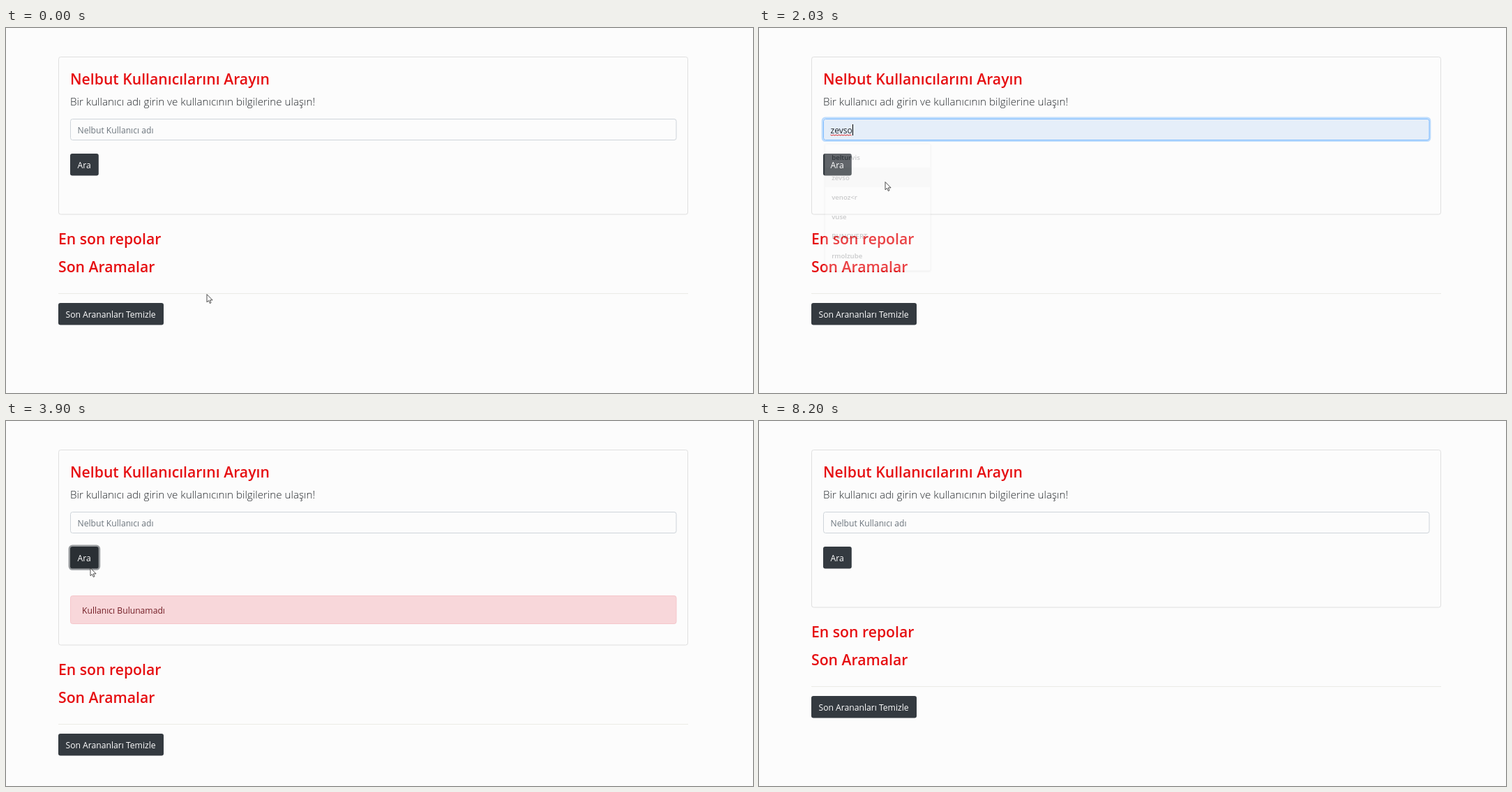
Write an HTML page that moves like this. It is 1071 px wide and 523 px high and loops after 8.23 s.

```html
<!DOCTYPE html>
<html lang="tr">
<head>
<meta charset="utf-8">
<title>Kullanıcı arama</title>
<style>
  html, body { margin: 0; width: 100%; height: 100%; overflow: hidden; background: #fcfcfc; }
  svg { display: block; width: 100%; height: 100%; font: 12.15px "Open Sans", "Noto Sans", sans-serif; fill: #212529; }
  .title { font-size: 21.2px; font-weight: 600; fill: #e60f12; }
  .lead { font-size: 15.2px; font-weight: 300; }
  .line { fill: none; stroke: #dfdfdf; }
  .dark { fill: #343a40; }
  .light { fill: #fff; }
  .ring { fill: none; stroke-width: 2.6; }
  #popup { font-size: 10px; font-weight: 600; transform-origin: 170px 257px; }
  #sheet { fill: #fcfcfc; stroke: #dedede; stroke-width: .6; filter: drop-shadow(0 1px 1.5px #0004); }
  #pointer path { stroke-linejoin: round; stroke-linecap: round; }
</style>
</head>
<body>
<svg viewBox="0 0 1071 523">
  <rect id="card" class="line" x="75.5" y="41.5" width="902" height="225.5" rx="3"/>
  <text class="title" x="92" y="81">Nelbut Kullanıcılarını Arayın</text>
  <text class="lead" x="92" y="111">Bir kullanıcı adı girin ve kullanıcının bilgilerine ulaşın!</text>

  <rect id="inputRing" class="ring" x="91" y="128.7" width="871" height="33" rx="4" stroke="#007bff"/>
  <rect id="input" x="92.5" y="130.5" width="868.5" height="30" rx="3"/>
  <text id="value" x="102.5" y="151"></text>
  <path id="squiggle" fill="none" stroke="#e02020"/>
  <path id="caret" stroke="#000" d="M0 138v16"/>

  <rect id="buttonRing" class="ring" x="90.9" y="178.9" width="43" height="33.6" rx="4.2" stroke="#343a40"/>
  <rect id="button" x="92" y="180" width="40.8" height="31.4" rx="3"/>
  <text class="light" x="102.5" y="201">Ara</text>

  <g id="alert">
    <rect x="92.5" y="250.5" width="868.5" height="40" rx="3" fill="#f8d7da" stroke="#f5c6cb"/>
    <text x="109" y="276" fill="#721c24">Kullanıcı Bulunamadı</text>
  </g>

  <g id="lower">
    <text class="title" x="75" y="309.5">En son repolar</text>
    <text class="title" x="75" y="350">Son Aramalar</text>
    <path class="line" d="M75 380.5H978" style="stroke:#ebebe6"/>
    <rect class="dark" x="75" y="394" width="151" height="31.4" rx="3"/>
    <text class="light" x="85.5" y="415">Son Arananları Temizle</text>
  </g>

  <g id="popup">
    <rect id="sheet" x="91.5" y="162.5" width="157.5" height="189" rx="2"/>
    <rect id="highlight" x="92" width="156.5" height="29.3" fill="#ececec"/>
  </g>

  <g id="pointer">
    <path id="arrow" fill="#fff" stroke="#222" stroke-width=".8" d="M0 0V10.8L2.5 8.5 4.3 12.5 6 11.7 4.3 7.9H7.7Z"/>
    <path id="beam" fill="none" stroke="#333" d="M-2.5-5.5H-.8L0-5 .8-5.5H2.5M0-5V5M-2.5 5.5H-.8L0 5 .8 5.5H2.5"/>
    <path id="hand" fill="#fff" stroke="#222" stroke-width=".7" d="M-1 1Q0-.8 1 1V5Q2.3 4 3 5.3 4.4 4.6 5 6 6.8 5.7 6.8 7.5V10Q6.5 11.5 5.5 12.5V14H-.2V12.8L-4 8.2Q-4.2 6.4-2.5 7L-1 8.5Z"/>
  </g>
</svg>
<script>
const LOOP = 8230;
const $ = id => document.getElementById(id);
const set = (id, attrs) => { for (const k in attrs) $(id).setAttribute(k, attrs[k]); };
const show = (id, on) => { $(id).style.display = on ? '' : 'none'; };
const ramp = (t, start, length) => Math.min(1, Math.max(0, (t - start) / length));
const ease = p => p * p * (3 - 2 * p);
const mix = (a, b, p) => a + (b - a) * p;
const blend = (a, b, p) => `rgb(${a.map((v, i) => Math.round(mix(v, b[i], p)))})`;

const FOCUS = 720, PICK = 1930, PRESS = 2870, RELEASE = 3020, ALERT = 3400, CLEAR = 5400, BLUR = 7400;
const HOVER_IN = 2440, HOVER_OUT = 3840;
const names = ['belturvis', 'zevso', 'venoz<r', 'vuse', 'BUNOVERT', 'rmolzube'];
const ROW = 29.3, FIRST_ROW = 168.3;

// time, x, y
const route = [
  [30, 288, 382], [690, 261, 150], [900, 261, 150], [1430, 183, 216], [1630, 183, 216],
  [1900, 181, 221], [2120, 181, 221], [2620, 114, 192], [3700, 115, 193], [3900, 121, 211],
  [4400, 215, 278], [4950, 250, 285], [5770, 690, 330], [5930, 720, 335], [6100, 720, 335],
  [6330, 856, 405], [6830, 962, 530]
];

names.forEach((name, i) => {
  const label = document.createElementNS('http://www.w3.org/2000/svg', 'text');
  label.textContent = name;
  label.setAttribute('x', 101.5);
  label.setAttribute('y', 186.7 + i * ROW);
  $('popup').append(label);
});

function pointerAt(t) {
  const next = route.findIndex(p => p[0] > t);
  if (next === 0) return route[0].slice(1);
  if (next < 0) return route.at(-1).slice(1);
  const [a, b] = [route[next - 1], route[next]];
  const p = ease(ramp(t, a[0], b[0] - a[0]));
  return [mix(a[1], b[1], p), mix(a[2], b[2], p)];
}

function drawInput(t, hovered) {
  const picked = t >= PICK && t < ALERT;
  const text = picked ? names[1] : names[hovered];
  const focused = t >= FOCUS && t < PRESS;
  const focus = ramp(t, FOCUS, 150) - ramp(t, PRESS, 100);
  set('input', {
    fill: text ? '#e5eef9' : '#fcfcfc',
    stroke: blend([206, 212, 218], [128, 189, 255], focus)
  });
  set('inputRing', { 'stroke-opacity': .25 * focus });
  $('value').textContent = text || 'Nelbut Kullanıcı adı';
  set('value', { fill: text ? '#212529' : '#6c757d' });

  const width = picked ? $('value').getComputedTextLength() : 0;
  set('caret', { transform: `translate(${Math.round(102.5 + width) + .5} 0)` });
  show('caret', focused && (t - FOCUS) % 1060 < 530);
  let wave = 'M102.5 153';
  for (let x = 2; x <= width; x += 2) wave += `l2 ${x % 4 ? 1 : -1}`;
  set('squiggle', { d: wave });
  show('squiggle', picked && focused);
}

function drawButton(t) {
  const hover = ramp(t, HOVER_IN, 150) - ramp(t, HOVER_OUT, 150);
  const active = ramp(t, PRESS, 120) - ramp(t, RELEASE, 150);
  set('button', { fill: blend([52, 58, 64], [35 - 6 * active, 39 - 6 * active, 43 - 7 * active], hover) });
  set('buttonRing', { 'stroke-opacity': t < BLUR ? .5 * ramp(t, PRESS, 150) : 0 });
}

function drawPopup(t, hovered) {
  const fade = ramp(t, PICK, 130);
  const row = t >= PICK ? 1 : hovered;
  show('popup', t >= FOCUS + 30 && fade < 1);
  $('popup').style.opacity = 1 - fade;
  $('popup').style.transform = `scale(${1 - .05 * fade})`;
  set('highlight', { y: FIRST_ROW + Math.max(0, row) * ROW });
  show('highlight', row >= 0);
}

function drawPointer(t, x, y) {
  const overInput = x > 92 && x < 961 && y > 130 && y < 161;
  const overButton = t >= HOVER_IN && t < HOVER_OUT;
  set('pointer', { transform: `translate(${x.toFixed(1)} ${y.toFixed(1)})` });
  show('pointer', y < 525);
  show('beam', overInput);
  show('hand', overButton && !overInput);
  show('arrow', !overInput && !overButton);
}

function draw(t) {
  const [x, y] = pointerAt(t);
  const listOpen = t >= FOCUS + 30 && t < PICK;
  const hovered = listOpen && x < 249 && y >= FIRST_ROW ? Math.floor((y - FIRST_ROW) / ROW) : -1;
  const alerted = t >= ALERT && t < CLEAR;
  const shift = alerted ? 54 : 0;
  set('card', { height: 225.5 + shift });
  set('lower', { transform: `translate(0 ${shift})` });
  show('alert', alerted);
  drawInput(t, hovered);
  drawButton(t);
  drawPopup(t, hovered);
  drawPointer(t, x, y);
}

const begin = performance.now();
function frame() {
  draw((performance.now() - begin) % LOOP);
  requestAnimationFrame(frame);
}
frame();
</script>
</body>
</html>
```
